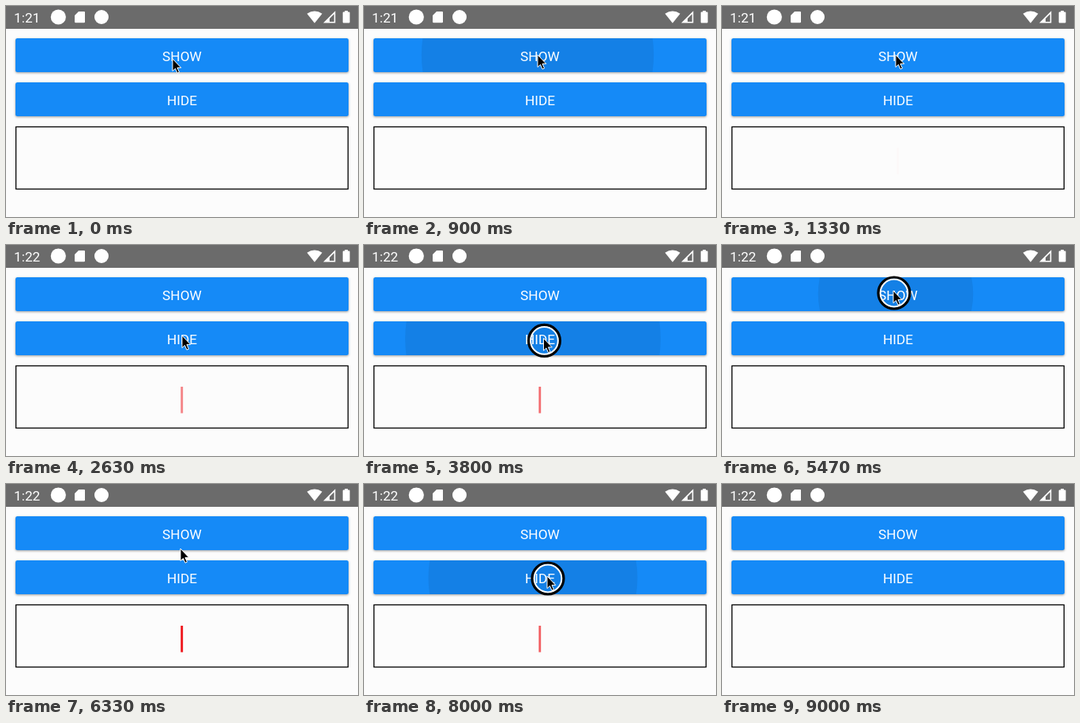
These frames come from a looping animation (446x268 px, 9.16 s). An HTML page:

```html
<!DOCTYPE html>
<html lang="en">
<head>
<meta charset="utf-8">
<title>Show and hide</title>
<style>
  html, body { margin: 0; width: 100%; height: 100%; overflow: hidden; background: #fcfcfc; }
  svg { display: block; width: 446px; height: 268px; }
  text { font-family: Roboto, Arial, sans-serif; fill: #fff; }
  .label { font-size: 17.3px; text-anchor: middle; }
  .button { fill: #158af7; filter: drop-shadow(0 1px 1.5px rgba(0, 0, 0, .38)); }
</style>
</head>
<body>
<svg viewBox="0 0 446 268">
  <defs>
    <clipPath id="showClip"><rect x="12" y="41" width="422" height="43" rx="2.5"/></clipPath>
    <clipPath id="hideClip"><rect x="12" y="97" width="422" height="43" rx="2.5"/></clipPath>
  </defs>
  <rect width="446" height="268" fill="#fcfcfc"/>

  <!-- Status bar -->
  <rect width="446" height="29" fill="#6b6b6b"/>
  <text id="clock" x="10" y="21" font-size="17.3">1:21</text>
  <g fill="#fff">
    <circle cx="66.3" cy="14" r="9.6"/>
    <path d="M92 7H99Q100 7 100 8V20Q100 21.3 99 21.3H88.3Q87 21.3 87 20V12Z"/>
    <circle cx="121" cy="14" r="9"/>
    <path d="M391 21.7L381.4 9.8Q391 3.2 400.6 9.8Z"/>
    <path d="M402 21.6L417.3 6.2V21.6ZM410 20H415.7V10.2L410 16Z" fill-rule="evenodd"/>
    <path d="M429.3 6H433V7.5H434.6Q435.6 7.5 435.6 8.5V20.6Q435.6 21.6 434.6 21.6H427.7Q426.7 21.6 426.7 20.6V8.5Q426.7 7.5 427.7 7.5H429.3Z"/>
  </g>

  <!-- Buttons -->
  <rect class="button" x="12" y="41" width="422" height="43" rx="2.5"/>
  <g clip-path="url(#showClip)"><circle id="showRipple" cx="220" cy="62"/></g>
  <text class="label" x="223" y="70">SHOW</text>
  <rect class="button" x="12" y="97" width="422" height="43" rx="2.5"/>
  <g clip-path="url(#hideClip)"><circle id="hideRipple" cx="214" cy="119"/></g>
  <text class="label" x="223" y="126">HIDE</text>

  <!-- Panel -->
  <rect x="12.6" y="153.5" width="420.8" height="79" fill="none" stroke="#000" stroke-width="1.3"/>
  <rect id="bar" x="221.4" y="180" width="2.8" height="33.6" fill="#ee1016"/>

  <!-- Pointer -->
  <g id="pointer">
    <g id="ring" fill="none">
      <circle cx="1" cy="3" r="17.6" stroke="#fff" stroke-width="2.4"/>
      <circle cx="1" cy="3" r="20" stroke="#000" stroke-width="3.2"/>
    </g>
    <path d="M0 0V15.6L3.5 12.4L6 18.2L8.5 17.1L6 11.4H10.8Z" fill="#000" stroke="#fff" stroke-width="1"/>
  </g>
</svg>
<script>
const LOOP = 9160;
const $ = id => document.getElementById(id);
const clamp = x => Math.max(0, Math.min(1, x));
const span = (t, a, b) => clamp((t - a) / (b - a));
const smooth = x => x * x * (3 - 2 * x);

const showPresses = [500, 5170];
const hidePresses = [3370, 7630];
const fadeIns = [1300, 5530];
const fadeOuts = [3560, 7800];
const ringSpans = [[70, 640], [5170, 5640], [7630, 8120], [3370, 3860]];

// time, x, y of the pointer tip
const path = [
  [0, 211, 67], [70, 211, 67], [230, 214, 66], [500, 214, 66], [800, 220, 62],
  [2400, 220, 62], [2600, 223, 115], [2700, 223, 115], [3000, 227, 118],
  [4670, 228, 119], [4840, 206, 84], [5000, 217, 58], [6150, 217, 58],
  [6330, 221, 82], [6650, 228, 113], [7000, 232, 117], [8160, 232, 117], [8440, 221, 114]
];

function pointerAt(t) {
  const i = path.findIndex(p => p[0] > t);
  if (i < 0) return path[path.length - 1].slice(1);
  const a = path[i - 1], b = path[i];
  const k = smooth(span(t, a[0], b[0]));
  return [a[1] + (b[1] - a[1]) * k, a[2] + (b[2] - a[2]) * k];
}

// Rises to full, dips to half once, then settles.
function bounce(e) {
  if (e < 0) return 0;
  if (e < 800) return .015 + .985 * (e / 800) ** 2;
  if (e < 1700) return .5 + .5 * ((e - 1250) / 450) ** 2;
  return 1;
}

function barAlpha(t) {
  const cycle = t < fadeIns[1] ? 0 : 1;
  const out = fadeOuts[cycle];
  return bounce(t - fadeIns[cycle]) * (1 - span(t, out, out + 610));
}

function drawRipple(node, presses, t) {
  const start = presses.find(p => t >= p && t < p + 840);
  const e = start === undefined ? 0 : t - start;
  node.setAttribute('r', 132 * clamp((e - 100) / 270 / 1.7) * 1.7);
  node.setAttribute('opacity', .07 * (1 - span(e, 520, 820)));
}

function drawRing(t) {
  const hit = ringSpans.find(([a, b]) => t > a && t < b);
  $('ring').setAttribute('opacity', hit ? span(t, hit[0], hit[0] + 60) : 0);
  const scale = hit ? 1.1 - .1 * span(t, hit[0], hit[0] + 160) : 1;
  $('ring').setAttribute('transform', `translate(1 3) scale(${scale}) translate(-1 -3)`);
}

function draw(t) {
  $('clock').textContent = t < 1900 ? '1:21' : '1:22';
  drawRipple($('showRipple'), showPresses, t);
  drawRipple($('hideRipple'), hidePresses, t);
  $('bar').setAttribute('opacity', barAlpha(t));
  drawRing(t);
  const [x, y] = pointerAt(t);
  $('pointer').setAttribute('transform', `translate(${x} ${y})`);
  $('pointer').setAttribute('visibility', t < 9000 ? 'visible' : 'hidden');
}

const begin = performance.now();
function tick() {
  draw((performance.now() - begin) % LOOP);
  requestAnimationFrame(tick);
}
tick();
</script>
</body>
</html>
```
